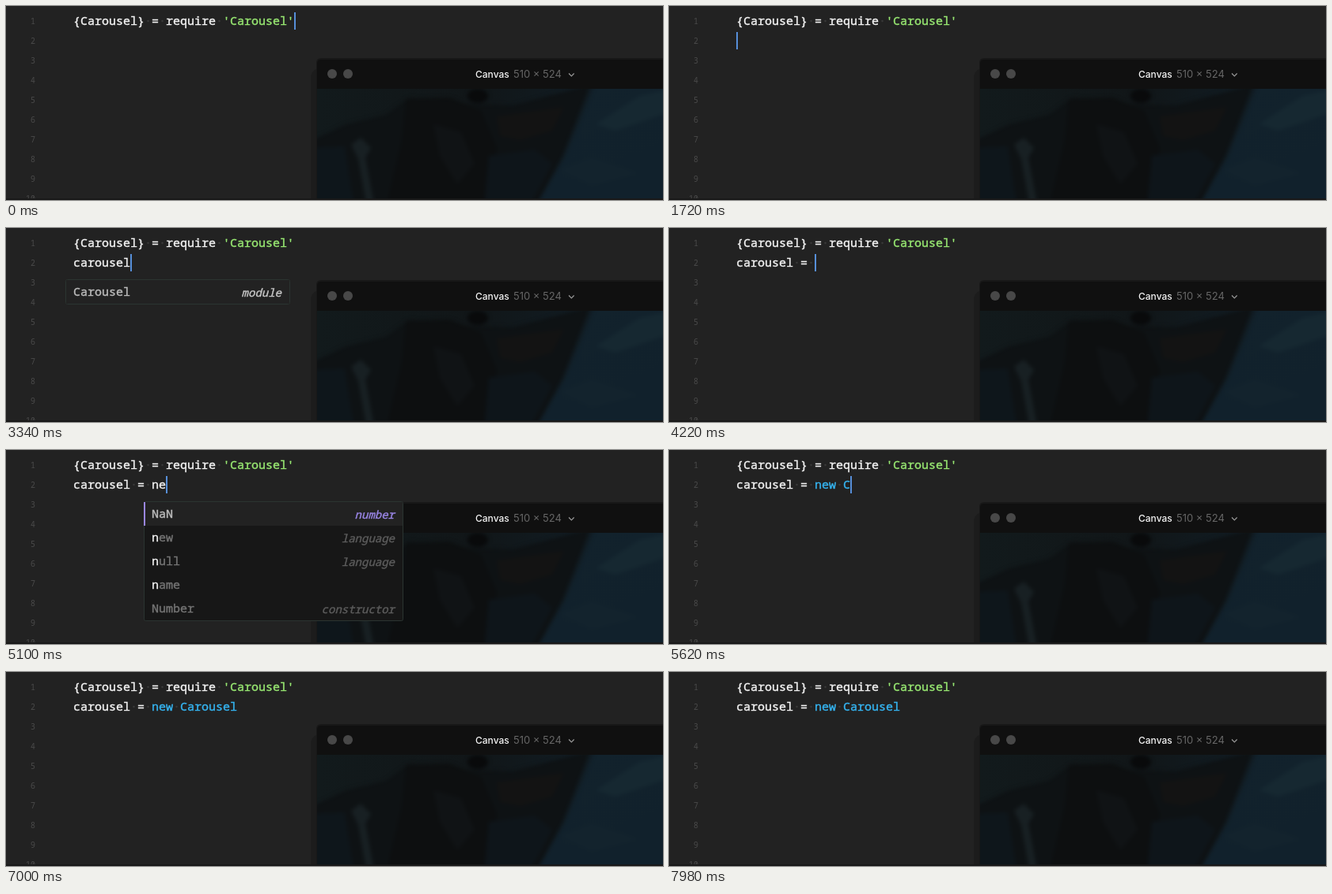
These frames come from a looping animation (830 by 246 pixels, 8000 ms). An HTML page:

```html
<!DOCTYPE html>
<html lang="en">
<head>
<meta charset="utf-8">
<title>Editor autocomplete</title>
<style>
  html, body { margin: 0; width: 100%; height: 100%; overflow: hidden; background: #222; }
  svg { display: block; width: 100%; height: 100%; }
  text { white-space: pre; font: 400 15px "Noto Sans Mono", monospace; }
  text, tspan { fill: currentColor; stroke: currentColor; stroke-width: .4px; }
  text, .match { color: #f4f4f4; }
  .num { font-size: 10px; color: #4a4a4a; stroke: none; text-anchor: end; }
  .dot { color: #3b3b3b; }
  .string { color: #98e872; }
  .keyword { color: #35b5f2; }
  .label { font-size: 14px; font-style: italic; text-anchor: end; }
  .title { font: 500 12px Inter, sans-serif; stroke: none; }
  .size { font-size: 13px; font-weight: 400; color: #666; }
</style>
</head>
<body>
<svg viewBox="0 0 830 246">
  <defs>
    <linearGradient id="sea" x1="0" y1="0" x2="1" y2="0">
      <stop offset="0" stop-color="#121a1c"/>
      <stop offset=".45" stop-color="#111618"/>
      <stop offset="1" stop-color="#11202a"/>
    </linearGradient>
    <linearGradient id="water" x1="0" y1="0" x2=".4" y2="1">
      <stop offset="0" stop-color="#12222c"/>
      <stop offset="1" stop-color="#11212c"/>
    </linearGradient>
    <filter id="soft" x="-20%" y="-20%" width="140%" height="140%" color-interpolation-filters="sRGB">
      <feGaussianBlur stdDeviation="2.5"/>
    </filter>
    <clipPath id="photo"><path d="M393 105H830V244H393Z"/></clipPath>
  </defs>
  <rect width="830" height="246" fill="#222"/>
  <g id="numbers"></g>

  <path d="M385 246V94Q385 82 392 80V246Z" fill="#1c1c1c"/>
  <path d="M392 246V72Q392 66 398 66H830V246Z" fill="#181818"/>
  <path d="M393 246V73Q393 68 398 68H830V246Z" fill="#101010"/>
  <circle cx="412" cy="86" r="6" fill="#484848"/>
  <circle cx="432" cy="86" r="6" fill="#484848"/>
  <text class="title" x="593" y="90.5">Canvas</text>
  <text class="title size" x="641" y="90.5">510 × 524</text>
  <path d="M711 85.5l3.3 3.3 3.3-3.3" fill="none" stroke="#999" stroke-width="1.2"/>

  <g clip-path="url(#photo)">
    <rect x="393" y="105" width="437" height="139" fill="url(#sea)"/>
    <g filter="url(#soft)">
      <path d="M746 95H840V256H668L706 190Z" fill="url(#water)"/>
      <path d="M383 172L430 150 480 138 510 116 575 124 640 126 738 100 702 192 668 256H383Z" fill="#0e1214"/>
      <path d="M383 180L428 178 440 256H383Z" fill="#0e161b"/>
      <path d="M505 118L560 116 600 132 620 180 612 256H480L500 170Z" fill="#0d0f10"/>
      <path d="M540 150L575 160 592 200 570 226 548 190Z" fill="#101315"/>
      <path d="M620 140L705 128 690 158 650 170 624 165Z" fill="#131313"/>
      <path d="M436 176L448 167 461 180 454 192 466 256H456L445 194Z" fill="#182023"/>
      <path d="M610 190L668 182 690 200 660 256H604Z" fill="#0e151a"/>
      <path d="M745 150L800 114 840 105V134L770 158Z" fill="#162831"/>
      <path d="M700 208L740 192 800 212 740 228Z" fill="#13232d"/>
      <ellipse cx="596" cy="114" rx="13" ry="9" fill="#090a0b"/>
    </g>
  </g>
  <rect y="244" width="830" height="2" fill="#191919"/>
  <g id="live"></g>
</svg>
<script>
const DURATION = 8000, LEFT = 85, CHAR = 9, BLINK = 500, ROW = 30;
const live = document.getElementById('live');

document.getElementById('numbers').innerHTML = Array.from({length: 10}, (_, i) =>
  `<text class="num" x="37" y="${23 + 25 * i}">${i + 1}</text>`).join('');

// Each keystroke: time and resulting second line (null = caret still on the first line).
const first = "{Carousel} = require 'Carousel'";
const keys = [[240, null], [1230, '']];
let typed = '';
const type = (string, ...times) =>
  times.forEach((time, i) => keys.push([time, typed += string[i]]));
type('carousel', 2060, 2220, 2380, 2540, 2700, 2860, 3020, 3200);
type(' = ', 3480, 3680, 3860);
type('new ', 4960, 5080, 5220, 5360);
type('Carousel', 5620, 5770, 5890, 6010, 6130, 6240, 6350, 6460);

const lists = {
  c: {width: 434, rows: ['Color:Color', 'class:language', 'case:language', 'catch:language', 'console', 'continue:language']},
  ca: {width: 301, rows: ['Canvas:Canvas', 'catch:language', 'canvasFrame', 'canvasScaleX', 'canvasScaleY', 'calculateVelocity']},
  module: {width: 283, rows: ['Carousel:module']},
  n: {width: 327, accent: '#9a86e6', rows: ['NaN:number', 'new:language', 'null:language', 'name', 'Number:constructor']},
  ne: {width: 283, rows: ['new:language']},
  both: {width: 283, rows: ['Carousel:module', 'carousel']}
};
// Popups: time, list, column of the completed word, matched prefix.
const popups = [
  [0], [2100, 'c', 0, 'c'], [2260, 'ca', 0, 'ca'], [2420, 'module', 0, 'car'], [3500],
  [5000, 'n', 11, 'n'], [5130, 'ne', 11, 'ne'], [5270, 'ne', 11, 'new'], [5380],
  [5670, 'c', 15, 'C'], [5810, 'ca', 15, 'Ca'], [5930, 'both', 15, 'Car'], [6060, 'both', 15, 'Caro'],
  [6180, 'both', 15, 'Carou'], [6290, 'both', 15, 'Carous'], [6400, 'both', 15, 'Carouse'],
  [6510, 'both', 15, 'Carousel'], [6900]
];

const latest = (events, t) => events.findLast(e => e[0] <= t) || events[0];
const span = (name, s) => `<tspan class="${name}">${s}</tspan>`;
const dots = s => s.replace(/ /g, span('dot', '·'));

function codeLine(y, code, marker, name) {
  const at = code.indexOf(marker), cut = at < 0 ? code.length : at;
  const tail = code.slice(cut).split(' ').map(s => span(name, s)).join(span('dot', '·'));
  return `<text x="${LEFT}" y="${y}">${dots(code.slice(0, cut))}${tail}</text>`;
}

function popup([, list, column, prefix]) {
  if (!list) return '';
  const {width, accent, rows} = lists[list];
  const x = LEFT + column * CHAR, left = x - 9.5, height = rows.length * ROW + 1;
  let out = `<rect x="${left}" y="65.5" width="${width}" height="${height}" rx="2" fill="#171717" stroke="#2b3431"/>
    <rect x="${left + .5}" y="66" width="${width - 1}" height="${ROW}" fill="#222"/>`;
  if (accent) out += `<rect x="${left - .5}" y="66" width="2" height="${ROW}" fill="${accent}"/>`;
  rows.forEach((row, i) => {
    const [word, label = ''] = row.split(':'), y = 86 + i * ROW;
    const n = word.startsWith(prefix) ? prefix.length : 0;
    const wordColor = i ? '#747474' : '#bcbcbc';
    const labelColor = i ? '#5c5c5c' : accent || '#c8c8c8';
    out += `<text x="${x}" y="${y}" style="color:${wordColor}">${span('match', word.slice(0, n))}${word.slice(n)}</text>
      <text class="label" x="${left + width - 10.5}" y="${y + 1}" style="color:${labelColor}">${label}</text>`;
  });
  return out;
}

let shown = '';
function render(t) {
  const [pressed, line] = latest(keys, t);
  const caretOn = Math.floor(Math.max(0, t - pressed) / BLINK) % 2 === 0;
  const onFirst = line === null;
  let scene = codeLine(24, first, "'", 'string') + codeLine(49, line || '', 'new', 'keyword');
  if (caretOn) {
    const x = LEFT + (onFirst ? first : line).length * CHAR;
    scene += `<rect x="${x}" y="${onFirst ? 8 : 33}" width="2" height="22" fill="#568ed8"/>`;
  }
  scene += popup(latest(popups, t));
  if (scene !== shown) live.innerHTML = shown = scene;
}

const start = performance.now();
function frame() {
  render((performance.now() - start) % DURATION);
  requestAnimationFrame(frame);
}
frame();
</script>
</body>
</html>
```
